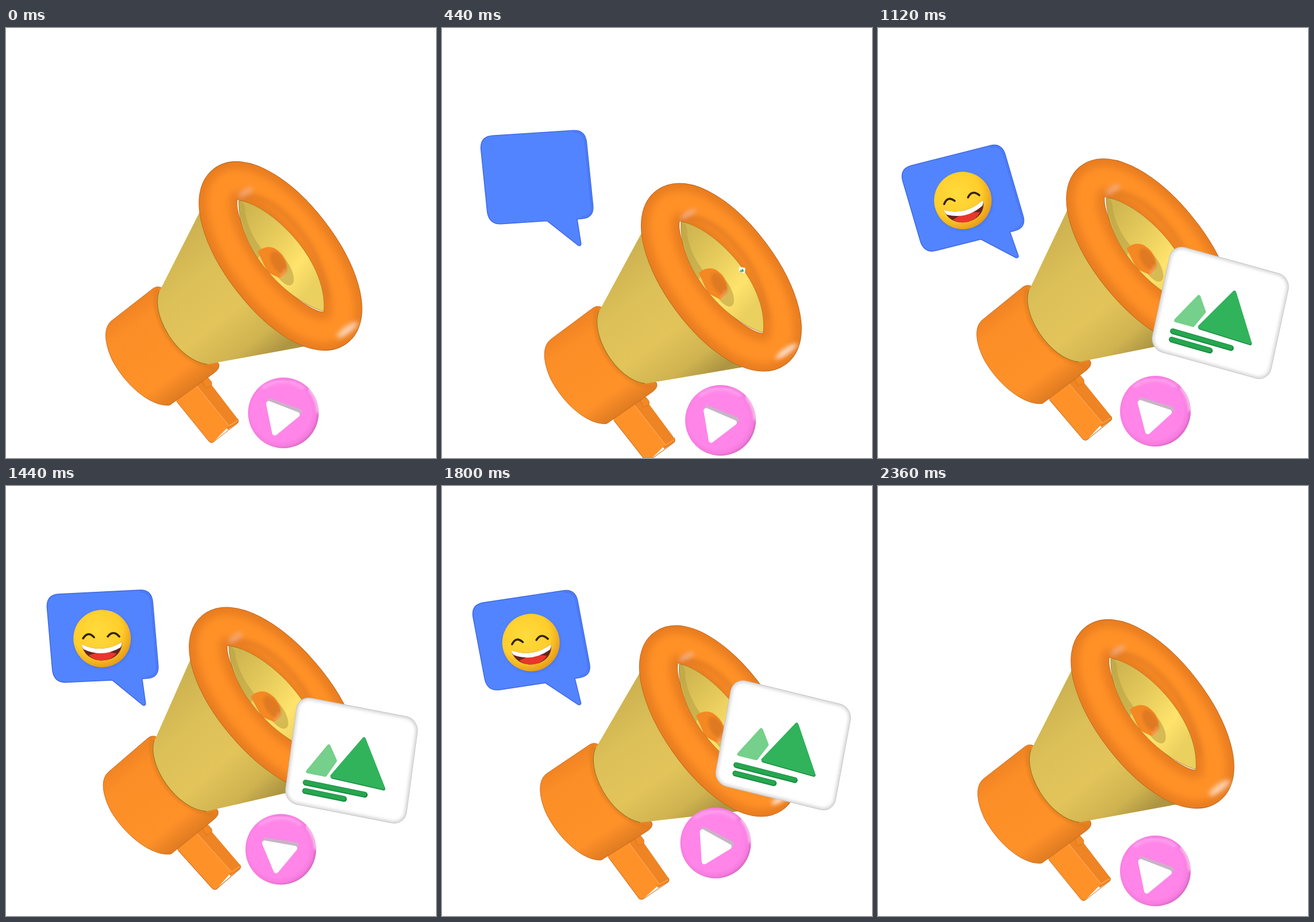
Recreate the animation shown at these times as an HTML page. Size 748x748 px, loop 2.4 s.

```html
<!DOCTYPE html>
<html lang="en">
<head>
<meta charset="utf-8">
<title>Megaphone</title>
<style>
  html, body { margin: 0; width: 100%; height: 100%; overflow: hidden; background: #fff; }
  svg { display: block; width: 100vw; height: 100vh; }
</style>
</head>
<body>
<svg viewBox="0 0 748 748">
  <defs>
    <filter id="soft" x="-30%" y="-30%" width="160%" height="160%"><feGaussianBlur stdDeviation="7"/></filter>
    <filter id="glow" x="-80%" y="-80%" width="260%" height="260%"><feGaussianBlur stdDeviation="4"/></filter>
    <filter id="edge" x="-10%" y="-10%" width="120%" height="120%"><feGaussianBlur stdDeviation="2.5"/></filter>
    <linearGradient id="cone" gradientUnits="userSpaceOnUse" x1="290" y1="370" x2="455" y2="578">
      <stop offset="0" stop-color="#cdb251"/><stop offset=".3" stop-color="#dcc058"/>
      <stop offset=".6" stop-color="#e2c45a"/><stop offset=".85" stop-color="#cfb350"/>
      <stop offset="1" stop-color="#ad9542"/>
    </linearGradient>
    <linearGradient id="body" gradientUnits="userSpaceOnUse" x1="215" y1="475" x2="330" y2="635">
      <stop offset="0" stop-color="#ee8122"/><stop offset=".2" stop-color="#fc8e27"/>
      <stop offset=".75" stop-color="#ff9129"/><stop offset="1" stop-color="#d8761f"/>
    </linearGradient>
    <linearGradient id="hole" gradientUnits="userSpaceOnUse" x1="408" y1="330" x2="540" y2="440">
      <stop offset="0" stop-color="#d0b650"/><stop offset=".35" stop-color="#e4c95b"/>
      <stop offset=".75" stop-color="#ffe36c"/><stop offset="1" stop-color="#ead05f"/>
    </linearGradient>
    <radialGradient id="pink" cx=".47" cy=".48" r=".53">
      <stop offset="0" stop-color="#ff86e8"/><stop offset=".8" stop-color="#ff85e8"/>
      <stop offset=".93" stop-color="#f47cdd"/><stop offset="1" stop-color="#d968c4"/>
    </radialGradient>
    <radialGradient id="face" cx=".42" cy=".36" r=".66">
      <stop offset="0" stop-color="#ffdc3c"/><stop offset=".65" stop-color="#ffcd2b"/>
      <stop offset="1" stop-color="#e69a17"/>
    </radialGradient>
    <path id="lens" d="M405 300C455 305 560 400 553 493C495 478 402 390 405 300Z"/>
    <ellipse id="ring" rx="157.7" ry="64.4" transform="translate(477.5 396.5) rotate(52.5)"/>
    <rect id="sheet" x="-107" y="-93" width="214" height="186" rx="23"/>
    <clipPath id="inLens"><use href="#lens"/></clipPath>
    <clipPath id="inDisc"><circle r="61.5"/></clipPath>
    <clipPath id="inSheet"><use href="#sheet"/></clipPath>
  </defs>

  <g id="horn">
    <g stroke-linejoin="round">
      <path d="M328 618L350 611L403 680Q406 685 402 688L386 699Z" fill="#ee8423"/>
      <path d="M294 646L328 618L388 692L361 720Q357 723 353 719Z" fill="#ff9129"/>
      <path d="M328 618L388 692L403 683" fill="none" stroke="#ffa24a" stroke-width="1.5"/>
      <path d="M297 650L353 719Q357 723 361 720L402 688Q406 685 403 680" fill="none" stroke="#c76c1d"/>
      <path d="M341 612Q346 605 352 609L357 615Q360 622 354 624L347 626Z" fill="#f18824" stroke="#cf721f" stroke-width=".8"/>
    </g>
    <path d="M256 453L184 509C168 522 172 550 185 578C210 625 255 660 285 656L362 600Q373 592 370 584L300 500L271 452Q264 448 256 453Z"
      fill="url(#body)" stroke="#c4691d" stroke-width=".9"/>
    <path d="M263 452C246 500 296 584 362 591" fill="none" stroke="#d9771f" stroke-width="3" filter="url(#edge)"/>
    <path d="M341 312L266 460C251 500 299 579 350 585L530 552L480 400Z" fill="url(#cone)"/>
    <path d="M266 458C251 500 299 579 350 585" fill="none" stroke="#a9731f" stroke-width="1.3"/>

    <g fill="none">
      <use href="#ring" stroke="#b25d1b" stroke-width="67"/>
      <use href="#ring" stroke="#e97d20" stroke-width="65.4"/>
      <use href="#ring" stroke="#ff9128" stroke-width="40" filter="url(#soft)"/>
    </g>
    <path d="M408 296Q450 282 505 345Q548 395 560 470" fill="none" stroke="#dc7720" stroke-width="9" opacity=".65" filter="url(#glow)"/>
    <ellipse cx="417" cy="286" rx="15" ry="5" transform="rotate(-32 417 286)" fill="#f3b398" opacity=".75" filter="url(#glow)"/>
    <ellipse cx="594" cy="525" rx="22" ry="6" transform="rotate(-36 594 525)" fill="#ffe6dc" opacity=".85" filter="url(#glow)"/>
    <use href="#lens" fill="url(#hole)"/>
    <g clip-path="url(#inLens)">
      <path d="M400 295Q417 300 416 322Q424 360 448 388L430 410Z" fill="#b9a044" opacity=".55"/>
      <ellipse cx="481" cy="420" rx="31" ry="14" transform="rotate(60 481 420)" fill="#c7ac4a" opacity=".7"/>
      <path d="M438 389Q452 377 467 383Q486 395 488 414Q488 430 476 435L455 425Z" fill="#f48822"/>
      <ellipse cx="474" cy="408" rx="21" ry="11" transform="rotate(60 474 408)" fill="#df7920" filter="url(#edge)"/>
      <path d="M486 419Q484 430 476 433" fill="none" stroke="#ffb58a" stroke-width="2.5" filter="url(#edge)"/>
    </g>
    <use href="#lens" fill="none" stroke="#b87522" stroke-width=".9"/>
  </g>

  <g id="sparks" stroke-linecap="round"></g>

  <g id="button">
    <circle r="61.5" fill="url(#pink)"/>
    <g clip-path="url(#inDisc)">
      <path d="M-38-42Q0-68 36-42" fill="none" stroke="#ffa5f0" stroke-width="5" filter="url(#edge)"/>
      <path d="M45-42Q60-24 61 0" fill="none" stroke="#ffdcf8" stroke-width="5" filter="url(#edge)"/>
    </g>
    <g id="play" stroke-width="9" stroke-linejoin="round">
      <path d="M-25-19L26-1L-16 34Z" fill="#c9b3c6" stroke="#c9b3c6" transform="translate(1.5 -1.5)"/>
      <path d="M-25.500-16L24 3L-15 35Z" fill="#fff" stroke="#fff"/>
    </g>
  </g>

  <g id="bubble">
    <path d="M-138-201H2Q23-201 24-179L28-69Q29-47 7-47H-1L3-3Q2 1-2-1L-53-47H-133Q-154-47-156-69L-160-179Q-160-201-138-201Z"
      fill="#5384ff" stroke="#3f6be6" stroke-width="1.6"/>
    <path d="M2-198Q20-198 21-179L25-69Q26-50 7-50" fill="none" stroke="#466fe9" stroke-width="1.2"/>
    <g id="emoji">
      <circle cx="1" cy="2" r="50" fill="#2f50b5" opacity=".3" filter="url(#edge)"/>
      <circle r="50" fill="url(#face)"/>
      <path d="M-33-2Q-24-15-14-3M10-3Q20-15 30-2" fill="none" stroke="#35230f" stroke-width="3.6" stroke-linecap="round"/>
      <path d="M-36 8Q-2 27 34 8C34 27 18 38 0 38C-18 38-34 27-36 8Z" fill="#66241f"/>
      <path d="M-25 28Q0 19 24 27Q14 38 0 38Q-15 38-25 28Z" fill="#e8362b"/>
      <path d="M-36 8Q-2 27 34 8Q34 13 31 17Q-2 34-33 17Q-36 13-36 8Z" fill="#fff"/>
    </g>
  </g>

  <g id="card">
    <use href="#sheet" fill="#fff" stroke="#bdbdbd" stroke-width="1.2"/>
    <g clip-path="url(#inSheet)"><use href="#sheet" fill="none" stroke="#d8d8d8" stroke-width="7" filter="url(#edge)"/></g>
    <g stroke-linejoin="round" stroke-width="6">
      <path d="M-42.500-17L-28 5.500L-42 33.500L-73 33.500Z" fill="#74d08a" stroke="#74d08a"/>
      <path d="M16.500-40L-30 33.500L61 36.500Z" fill="#1b8c40" stroke="#1b8c40" transform="translate(1 1)"/>
      <path d="M16.500-41L-30 33L61 36Z" fill="#30b35b" stroke="#30b35b"/>
    </g>
    <g fill="none" stroke-linecap="round">
      <path id="bars" d="M-74 53L31 54M-73 67.500L-4 68" stroke="#168a3c" stroke-width="10"/>
      <path d="M-74 52.500L30 53.500M-73 67L-5 67.500" stroke="#25a64f" stroke-width="7.500"/>
    </g>
  </g>
</svg>

<script>
const LOOP = 2400, STEP = 40;
const $ = id => document.getElementById(id);

// time, dx, dy, shear y, shear x, stretch
const horn = [
  [0, 0, 0, 0, 0, 0],
  [200, -14, -50, -.09, .08, .008],
  [440, 7, 35, .012, -.026, -.01],
  [760, -15.5, -54, -.1, .088, .01],
  [1000, 5, 30, .01, -.02, -.01],
  [1120, -4, -4, -.017, .027, 0],
  [1270, -14, -42, -.085, .078, .005],
  [1440, -9, -19, -.045, .055, 0],
  [1640, 6, 33, .03, -.03, -.015],
  [1800, 1.2, 3, .065, -.045, -.02],
  [2040, -14, -50, -.09, .08, .01],
  [2280, -9, -19, -.045, .055, 0],
  [2360, 0, 0, 0, 0, 0]
];
// time, x, y, angle
const button = [
  [0, 482.5, 669.5, 0],
  [200, 472, 590, -10],
  [440, 484.5, 682.5, 2],
  [760, 468, 561.5, -13],
  [1000, 485, 685, 2],
  [1120, 482.5, 666.5, -3],
  [1270, 474, 600, -12],
  [1440, 478, 632, -11],
  [1640, 484, 684, 2],
  [1800, 476, 621, 8],
  [2040, 470, 580, -10],
  [2280, 479, 645, -7],
  [2360, 482.5, 669.5, 0]
];
// time, x, y, angle, scale
const bubble = [
  [200, 239, 388, -14, 0],
  [390, 239, 381, -5, 1],
  [440, 239, 379, -3.7, 1],
  [640, 238, 363, 7, 1],
  [760, 238, 368, 6.1, 1],
  [1120, 242, 400, -14.2, 1],
  [1180, 242, 404, -17, 1],
  [1440, 240, 382, -2.8, 1],
  [1700, 241, 402, -17, 1],
  [1800, 239, 381, -8.6, 1],
  [2010, 238, 364, 4, 1],
  [2220, 239, 380, -5, 0]
];
const card = [
  [420, 520, 419, 11, 0],
  [440, 522, 421, 11, .05],
  [620, 604, 462, 11, 1.08],
  [760, 602, 466, 12, 1.07],
  [1120, 595.5, 495.5, 15.5, 1],
  [1440, 601, 477.5, 11, 1],
  [1800, 593.5, 451, 13.8, 1],
  [2000, 602, 462, 12, 1.07],
  [2200, 522, 421, 11, 0]
];
// time, y, scale
const emoji = [[460, -112, 0], [620, -107, 1.08], [760, -107, 1], [1000, -120, 1]];

// x, y, length along x, length along y
const rays = [[460, 235, 13, -42], [514, 274, 38, -38], [547, 328, 40, -11]];
const bursts = [80, 640, 1900], LIFE = 280;

const clamp = v => Math.max(0, Math.min(1, v));

// Smooth curve through the keys, flat at each turning point
function pose(keys, t) {
  const last = keys.length - 1;
  if (t <= keys[0][0]) return keys[0].slice(1);
  if (t >= keys[last][0]) return keys[last].slice(1);
  const i = keys.findIndex(k => k[0] > t) - 1;
  const a = keys[i], b = keys[i + 1], h = b[0] - a[0], u = (t - a[0]) / h;
  const slope = (n, c) => n < 0 || n >= last ? 0 : (keys[n + 1][c] - keys[n][c]) / (keys[n + 1][0] - keys[n][0]);
  const tangent = (n, c) => {
    const p = slope(n - 1, c), q = slope(n, c);
    return p * q <= 0 ? 0 : 2 * p * q / (p + q);
  };
  return a.slice(1).map((v, j) => {
    const c = j + 1, w = u * u * (3 - 2 * u);
    return v + (b[c] - v) * w + h * u * (1 - u) * ((1 - u) * tangent(i, c) - u * tangent(i + 1, c));
  });
}

const place = (id, value) => $(id).setAttribute('transform', value);

const lines = rays.map(() => ['#d9a457', '#fac87a'].map((color, i) => {
  const line = document.createElementNS('http://www.w3.org/2000/svg', 'line');
  line.setAttribute('stroke', color);
  if (!i) line.setAttribute('transform', 'translate(2 1)');
  return $('sparks').appendChild(line);
}));

function drawSparks(t) {
  const start = bursts.find(s => t > s && t < s + LIFE);
  $('sparks').style.display = start === undefined ? 'none' : '';
  if (start === undefined) return;
  const k = (t - start) / LIFE, out = clamp((k - .43) / .57);
  const head = clamp(k / .42) + .7 * out, tail = 1.7 * out;
  const width = 24 * Math.min(1, 2.5 * (head - tail));
  rays.forEach(([x, y, dx, dy], i) => lines[i].forEach(line => {
    const set = { x1: x + dx * tail, y1: y + dy * tail, x2: x + dx * head, y2: y + dy * head, 'stroke-width': width };
    for (const name in set) line.setAttribute(name, set[name]);
  }));
}

function draw(t) {
  const [dx, dy, b, c, d] = pose(horn, t);
  place('horn', `matrix(1 ${b} ${c} ${1 + d} ${350 + dx} ${450 + dy}) translate(-350 -450)`);

  const [px, py, turn] = pose(button, t);
  place('button', `translate(${px} ${py})`);
  place('play', `rotate(${turn})`);

  const [bx, by, tilt, size] = pose(bubble, t);
  place('bubble', `translate(${bx} ${by}) rotate(${tilt}) scale(${size})`);
  const [ey, grow] = pose(emoji, t);
  place('emoji', `translate(-67 ${ey}) scale(${grow})`);

  const [cx, cy, lean, zoom] = pose(card, t);
  place('card', `translate(${cx} ${cy}) rotate(${lean}) skewX(3.3) scale(${zoom})`);
  $('bubble').style.display = size > 0 ? '' : 'none';
  $('card').style.display = zoom > 0 ? '' : 'none';

  drawSparks(t);
}

const begin = performance.now();
function tick() {
  const t = (performance.now() - begin) % LOOP;
  draw(Math.floor(t / STEP) * STEP);
  requestAnimationFrame(tick);
}
tick();
</script>
</body>
</html>
```
